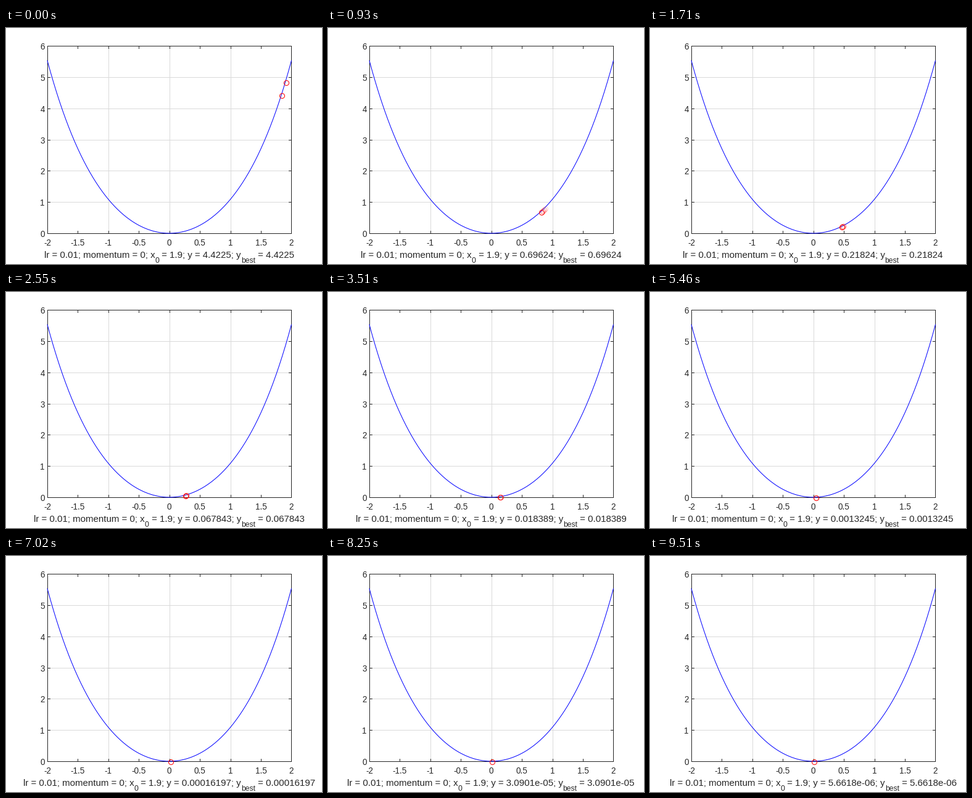
Animation of 512 by 384 pixels, one loop 9.54 s. Source, as a matplotlib script:

```python
import matplotlib.pyplot as plt
import numpy as np
from matplotlib.animation import FuncAnimation

W, H, DPI = 512, 384, 100
LEFT, RIGHT, TOP, BOTTOM = 67, 462.4, 29, 334
FRAMES, STEP_MS = 318, 30
RATE, START = 0.01, 1.9
INK, GRID = "#262626", "#dadada"
FADE = [1, 0.5, 0.35, 0.18]  # newest point first

plt.rcParams["font.family"] = "Liberation Sans"


def cost(x):
    return 2 * np.cosh(x) - 2


def px(x):
    return LEFT + (x + 2) / 4 * (RIGHT - LEFT)


def py(y):
    return BOTTOM - y / 6 * (BOTTOM - TOP)


def pt(pixels):
    return pixels * 72 / DPI


path = [START]
for _ in range(FRAMES):
    path.append(path[-1] - RATE * 2 * np.sinh(path[-1]))

fig = plt.figure(figsize=(W / DPI, H / DPI), dpi=DPI, facecolor="white")
ax = fig.add_axes([0, 0, 1, 1])
ax.set(xlim=(0, W), ylim=(H, 0))
ax.axis("off")


def line(xs, ys, color=INK, z=2, **kw):
    return ax.plot(xs, ys, color=color, lw=pt(1), zorder=z, **kw)[0]


def label(x, y, text, size, ha="left"):
    return ax.text(x, y, text, fontsize=pt(size), color=INK, ha=ha, va="baseline")


# Grid, ticks and tick labels
for v in np.arange(-2, 2.1, 0.5):
    x = px(v)
    if v in (-1, 0, 1):
        line([x, x], [TOP, BOTTOM], GRID, 1)
    line([x, x], [BOTTOM, BOTTOM - 4])
    line([x, x], [TOP, TOP + 4])
    label(x, 354, f"{v:g}", 13.5, "center")
for v in range(7):
    y = py(v)
    if 0 < v < 6:
        line([LEFT, RIGHT], [y, y], GRID, 1)
    line([LEFT, LEFT + 4], [y, y])
    line([RIGHT, RIGHT - 4], [y, y])
    label(63, y + 6, str(v), 13.5, "right")
line([LEFT, RIGHT, RIGHT, LEFT, LEFT], [TOP, TOP, BOTTOM, BOTTOM, TOP])

xs = np.linspace(-2, 2, 401)
line(px(xs), py(cost(xs)), "blue", 3)

dots = [
    line([], [], z=5 - 0.1 * age, marker="o", ms=pt(8), mfc="none", mec="red", mew=pt(1))
    for age in range(len(FADE))
]

# Caption made of runs, with lowered subscripts
BASE, SUB = (374, 15), (382, 12.1)
STYLES = (BASE, SUB, BASE, SUB, BASE)
runs = [label(0, y, "", size) for y, size in STYLES]
probe = {size: label(-900, -900, "", size) for _, size in (BASE, SUB)}


def advance(text, size):
    def width(s):
        probe[size].set_text(s)
        return probe[size].get_window_extent().width

    return width("|" + text + "|") - width("||")


def set_caption(y):
    value = f"{y:.5g}"
    parts = [
        "lr = 0.01; momentum = 0; x", "0",
        f" = 1.9; y = {value}; y", "best", f" = {value}",
    ]
    widths = [advance(part, size) for part, (_, size) in zip(parts, STYLES)]
    x = (LEFT + RIGHT - sum(widths)) // 2
    for run, part, w in zip(runs, parts, widths):
        run.set_text(part)
        run.set_x(x)
        x += w


def spot(k):
    """Centre of the pixel that holds step k."""
    return round(px(path[k])) + 0.5, round(py(cost(path[k]))) + 0.5


def update(i):
    newest = spot(i + 1)
    for age, dot in enumerate(dots):
        k = i + 1 - age
        shown = age == 0 or (k >= 0 and spot(k) != newest)
        dot.set_visible(shown)
        if shown:
            x, y = spot(k)
            dot.set_data([x], [y])
            dot.set_alpha(FADE[age] if i else 1)
    set_caption(cost(path[i + 1]))
    return dots + runs


anim = FuncAnimation(
    fig, update, frames=FRAMES, interval=STEP_MS, repeat=True, repeat_delay=0, blit=False
)
plt.show()
```
